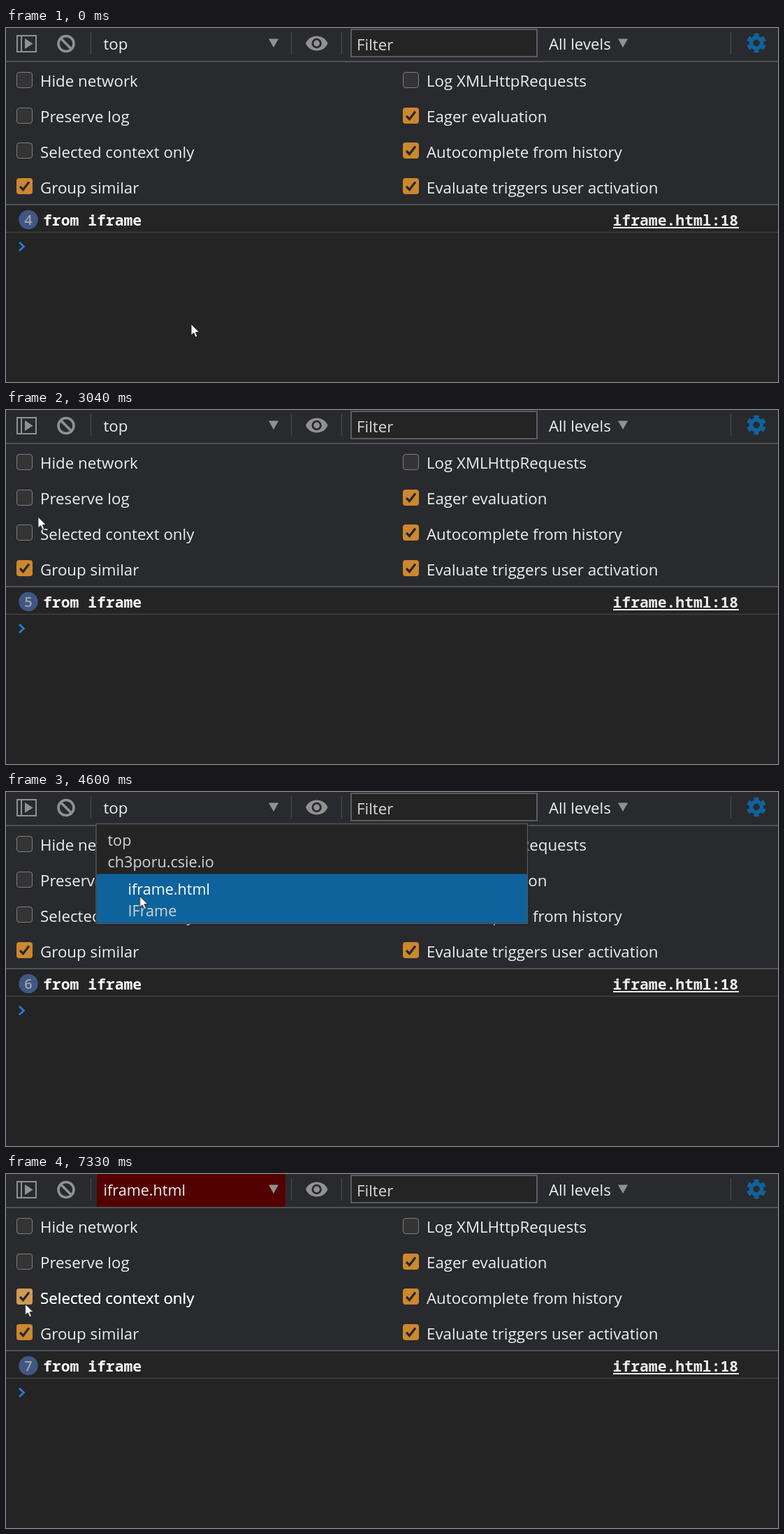
Animation, 1105 px wide and 507 px high, one loop 7.85 s. Source, as an HTML page:

```html
<!DOCTYPE html>
<html lang="en">
<head>
<meta charset="utf-8">
<title>Console context filter</title>
<style>
html, body { margin: 0; width: 100%; height: 100%; overflow: hidden; background: #242424; }
svg { display: block; width: 1105px; height: 507px; }
text { font: 22.3px "Open Sans", "Noto Sans", sans-serif; fill: #eeeff0; }
.mono { font: 700 21.4px "Noto Sans Mono", "DejaVu Sans Mono", monospace; fill: #f8f8f8; }
.link { font-weight: 600; fill: #ebebeb; }
.badge text { font-size: 20px; font-weight: 600; fill: #a2a4a8; text-anchor: middle; }
.menu text { font-size: 21.6px; fill: #d0d4d8; }
.rule { stroke: #505356; stroke-width: 2; }
.split { stroke: #434548; stroke-width: 1.5; }
.icon { fill: #919191; }
.field { fill: #242424; stroke: #5c5c5c; stroke-width: 2; }
.tip rect { fill: #292929; stroke: #404040; }

/* Timeline: one 7850 ms loop, every switch is a hard cut */
.timed { opacity: 0; animation: 7850ms step-end infinite; }
.filtered { animation-name: filtered; }
.unfiltered { animation-name: unfiltered; }
.checked { animation-name: checked; }
.hover { animation-name: hover; }
.group-hover { animation-name: group-hover; }
.group-tip { animation-name: group-tip; }
.context-tip { animation-name: context-tip; }
.menu { animation-name: menu; }
.first { animation-name: first; }
.second { animation-name: second; }
.in-frame { animation-name: in-frame; }
.click { animation-name: click; }
.n4 { animation-name: n4; }
.n5 { animation-name: n5; }
.n6 { animation-name: n6; }
.n7 { animation-name: n7; }
@keyframes filtered { 0%, 33.75% { opacity: 0 } 22.93% { opacity: 1 } }
@keyframes unfiltered { 0%, 33.75% { opacity: 1 } 22.93% { opacity: 0 } }
@keyframes checked { 0%, 33.75% { opacity: 0 } 22.93%, 80.25% { opacity: 1 } }
@keyframes hover { 0%, 38.72% { opacity: 0 } 13.12%, 76.3% { opacity: 1 } }
@keyframes group-hover { 0%, 13.12% { opacity: 0 } 10.06% { opacity: 1 } }
@keyframes group-tip { 0%, 13.12% { opacity: 0 } 11.08% { opacity: 1 } }
@keyframes context-tip { 0%, 22.03% { opacity: 0 } 14.14% { opacity: 1 } }
@keyframes menu { 0%, 61.52% { opacity: 0 } 47.77% { opacity: 1 } }
@keyframes first { 0% { opacity: 1 } 56.64% { opacity: 0 } }
@keyframes second { 0% { opacity: 0 } 56.64% { opacity: 1 } }
@keyframes in-frame { 0% { opacity: 0 } 61.52% { opacity: 1 } }
@keyframes click {
  0%, 23.94%, 34.64%, 48.66%, 62.54%, 82.29% { opacity: 0 }
  22.03%, 32.86%, 46.62%, 60.5%, 79.23% { opacity: 1 }
}
@keyframes n4 { 0% { opacity: 1 } 16.94% { opacity: 0 } }
@keyframes n5 { 0%, 55.66% { opacity: 0 } 16.94% { opacity: 1 } }
@keyframes n6 { 0%, 93.37% { opacity: 0 } 55.66% { opacity: 1 } }
@keyframes n7 { 0% { opacity: 0 } 93.37% { opacity: 1 } }

/* The pointer is sampled about every 78 ms */
.pointer { animation: travel 7850ms infinite; }
@keyframes travel {
  0% { transform: translate(265px, 424px); animation-timing-function: steps(3) }
  2.74% { transform: translate(254px, 396px); animation-timing-function: steps(5) }
  7.31% { transform: translate(200px, 264px); animation-timing-function: steps(3) }
  10.06% { transform: translate(188px, 236px); animation-timing-function: steps(2) }
  12.1% { transform: translate(118.5px, 195.5px); animation-timing-function: steps(3) }
  15.16%, 37.7% { transform: translate(23px, 171px); animation-timing-function: steps(8) }
  45.7%, 49.68% { transform: translate(206px, 26px); animation-timing-function: steps(6) }
  55.66% { transform: translate(191px, 108px); animation-timing-function: steps(3) }
  58.59%, 71.46% { transform: translate(191.5px, 149px); animation-timing-function: steps(6) }
  77.32%, 100% { transform: translate(27.5px, 186px); animation-timing-function: step-end }
}
</style>
</head>
<body>
<svg viewBox="0 0 1105 507">
  <defs>
    <rect id="off" x=".5" y=".5" width="22" height="22" rx="3.5" fill="#343434" stroke="#7d7d7d"/>
    <path id="tick" d="M5 12 9.5 16.5 18 5.5" fill="none" stroke="#25292d" stroke-width="3.2"/>
    <g id="on">
      <rect width="23" height="23" rx="4" fill="#cd872f"/>
      <use href="#tick"/>
    </g>
    <path id="down" d="M0 0H14L7 12.5Z"/>
    <path id="prompt" d="M19 -6 25.5 0 19 6" fill="none" stroke-width="2.8"/>
  </defs>

  <rect width="1105" height="253" fill="#292a2d"/>
  <path class="rule" d="M0 48H1105M0 253H1105"/>

  <!-- Toolbar -->
  <g fill="none" stroke="#919191">
    <path stroke-width="2" d="M16 11H43V34H16ZM22 11V34"/>
    <circle cx="86" cy="22.5" r="11" stroke-width="3.6"/>
    <path stroke-width="3.6" d="M78.5 15 93.5 30"/>
  </g>
  <path class="icon" d="M27 15V30L38.5 22.5Z"/>
  <path class="split" d="M121.5 6V38M408.5 6V38M480.5 6V38"/>
  <text x="139.5" y="31">top</text>
  <g class="timed in-frame">
    <rect x="130" width="270" height="47" fill="#520000"/>
    <text x="139.5" y="31" style="font-size:21.6px">iframe.html</text>
  </g>
  <use href="#down" x="376" y="15.5" class="icon"/>
  <path class="icon" d="M429 22C434.5 8 455 8 460.5 22C455 36 434.5 36 429 22Z"/>
  <circle cx="444.7" cy="22" r="7.2" fill="#292a2d"/>
  <circle cx="444.7" cy="22" r="4.4" class="icon"/>

  <g class="timed unfiltered">
    <rect class="field" x="494" y="2" width="266" height="39"/>
    <text x="777" y="31">All levels</text>
    <use href="#down" x="876" y="15.5" class="icon"/>
    <path class="split" d="M1037.5 6V38"/>
  </g>
  <g class="timed filtered">
    <rect class="field" x="494" y="2" width="244.5" height="39"/>
    <text x="755" y="31">All levels</text>
    <use href="#down" x="854.5" y="15.5" class="icon"/>
    <path class="split" d="M927.5 6V38"/>
    <text x="945.5" y="31" style="fill:#9a9b9d">5 hidden</text>
  </g>
  <text x="502" y="31.5" style="fill:#d8d8d8">Filter</text>
  <g fill="none" stroke="#0f639e">
    <circle cx="1074" cy="21.5" r="7.6" stroke-width="5.6"/>
    <circle cx="1074" cy="21.5" r="11.6" stroke-width="4.6" pathLength="360" stroke-dasharray="34 26" stroke-dashoffset="-13"/>
  </g>

  <!-- Settings -->
  <use href="#off" x="15" y="63"/><text x="49" y="84">Hide network</text>
  <use href="#off" x="15" y="114"/><text x="49" y="135">Preserve log</text>
  <use href="#off" x="15" y="164"/><text x="49" y="185.5">Selected context only</text>
  <use href="#on" x="15" y="215"/><text x="49" y="236.5">Group similar</text>
  <use href="#off" x="568" y="63"/><text x="602" y="84">Log XMLHttpRequests</text>
  <use href="#on" x="568" y="114"/><text x="602" y="135">Eager evaluation</text>
  <use href="#on" x="568" y="164"/><text x="602" y="185.5">Autocomplete from history</text>
  <use href="#on" x="568" y="215"/><text x="602" y="236.5">Evaluate triggers user activation</text>
  <g class="timed checked"><use href="#on" x="15" y="164"/></g>
  <g class="timed hover">
    <text x="49" y="185.5" style="fill:#fff">Selected context only</text>
    <g class="timed checked">
      <rect x="15" y="164" width="23" height="23" rx="4" fill="#d09a55"/>
      <use href="#tick" x="15" y="164"/>
    </g>
  </g>
  <text class="timed group-hover" x="49" y="236.5" style="fill:#fff">Group similar</text>

  <!-- Messages -->
  <g class="timed unfiltered">
    <g class="badge">
      <circle cx="32" cy="274.5" r="13.7" fill="#405784"/>
      <text class="timed n4" x="32" y="282">4</text>
      <text class="timed n5" x="32" y="282">5</text>
      <text class="timed n6" x="32" y="282">6</text>
      <text class="timed n7" x="32" y="282">7</text>
    </g>
    <text class="mono" x="53" y="283">from iframe</text>
    <text class="mono link" x="868.5" y="283">iframe.html:18</text>
    <path d="M869 286H1049" stroke="#ebebeb" stroke-width="2"/>
    <path d="M0 292.5H1105" stroke="#404040" stroke-width="1.5"/>
    <use href="#prompt" y="313" stroke="#2f78d2"/>
  </g>
  <g class="timed filtered"><use href="#prompt" y="273.5" stroke="#6478a3"/></g>

  <!-- Tooltips -->
  <g class="timed tip group-tip">
    <rect x="3.5" y="256.5" width="172.5" height="49.5" rx="3"/>
    <text x="20" y="291">Group similar</text>
  </g>
  <g class="timed tip context-tip">
    <rect x="3.5" y="205.5" width="835" height="49.5" rx="3"/>
    <text x="20" y="240">Only show messages from the current context (top, iframe, worker, extension)</text>
  </g>

  <!-- Context menu -->
  <g class="timed menu">
    <rect x="128" y="45" width="621" height="146" fill="#000" opacity=".18"/>
    <rect x="129" y="45.5" width="617.5" height="143" fill="#242424" stroke="#555" stroke-width="1.5"/>
    <rect class="timed first" x="130" y="46.5" width="616" height="70.8" fill="#0e639c"/>
    <rect class="timed second" x="130" y="117.3" width="616" height="70.5" fill="#0e639c"/>
    <text x="145.5" y="76.5">top</text>
    <text x="145.5" y="107.5">ch3poru.csie.io</text>
    <text x="174.5" y="146.5" style="fill:#fff">iframe.html</text>
    <text x="174.5" y="178">IFrame</text>
  </g>

  <g class="pointer">
    <circle class="timed click" r="12" fill="#fff500" fill-opacity=".55"/>
    <path d="M0 0V16.2L3.7 12.8 6.3 18.8 9 17.6 6.5 11.8H11.6Z" fill="#fff" stroke="#1c1c1c" stroke-width="1"/>
  </g>
</svg>
</body>
</html>
```
